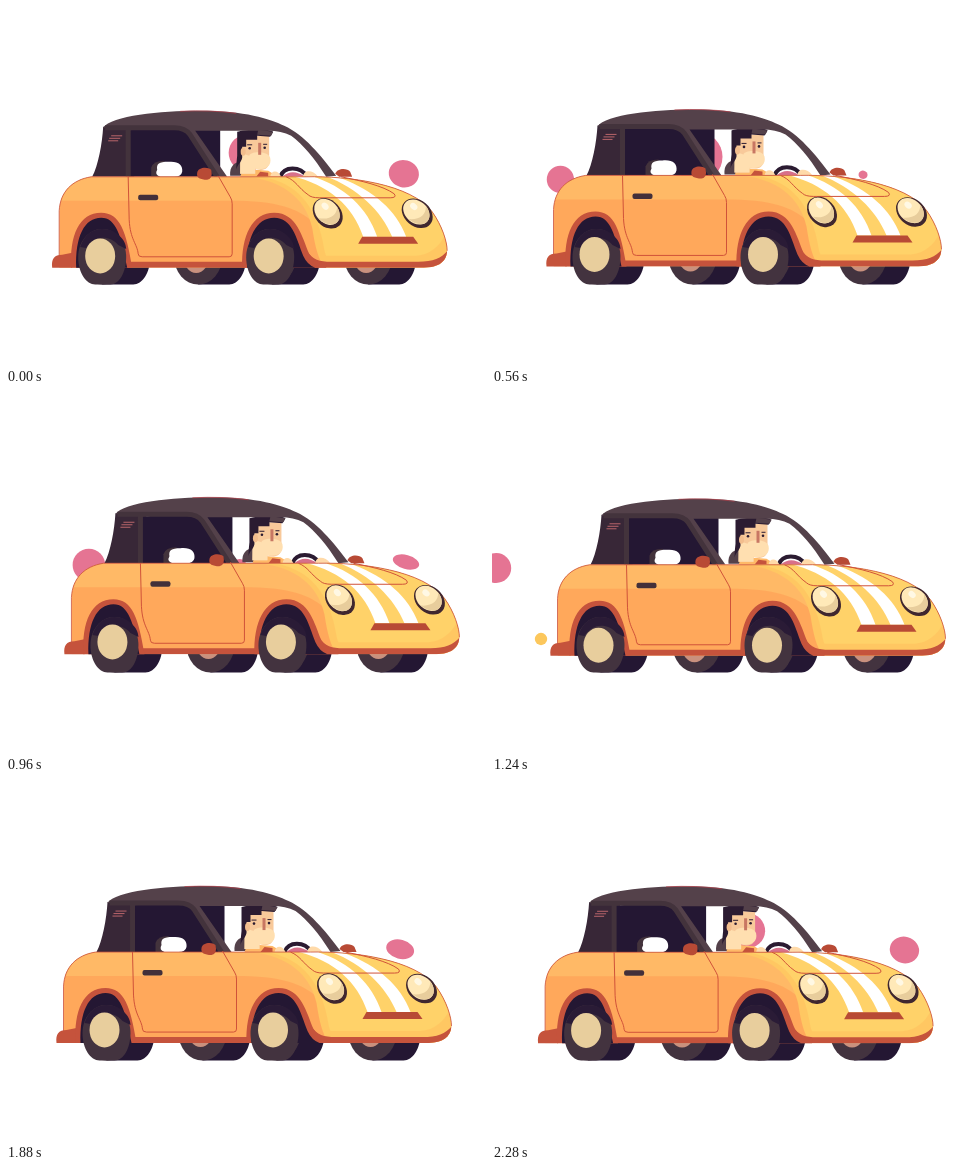
These frames come from a looping animation (480 by 360 pixels, 2.32 s). An HTML page:

```html
<!DOCTYPE html>
<html lang="en">
<head>
<meta charset="utf-8">
<title>Car ride</title>
<style>
html, body { margin: 0; width: 100%; height: 100%; overflow: hidden; background: #fff; }
svg { display: block; width: 100vw; height: 100vh; }
</style>
</head>
<body>
<svg viewBox="0 0 480 360">
  <defs>
    <g id="sideTread">
      <path fill="#241733" d="M96 223H119C134 223 144 236 144 251C144 267 136 278.500 127 278.500H96Z"/>
      <ellipse cx="96" cy="251" rx="24" ry="27.500" fill="#43333f"/>
    </g>
    <g id="face">
      <path fill="#43333f" d="M96 223C110 223 120 236 120 251C120 266 113 278.500 104 278.500H89C80 278.500 72 267 72 251C72 236 82 223 96 223Z"/>
      <path fill="#2a1b36" d="M96 223C110 223 120 234 120 243L112 239C103 229 88 229 80 242L74 241C78 229 86 223 96 223Z"/>
    </g>
    <clipPath id="shell">
      <path d="M85 171H300C342 170 405 178 426 206C436 220 441 236 441 245C440 258 430 262 415 262H53V205C54 186 66 174 85 171Z"/>
    </clipPath>
    <g id="lamp">
      <ellipse rx="13" ry="17" fill="#40272f"/>
      <ellipse cx=".5" cy="-1.5" rx="11" ry="14.500" fill="#ffe9b8"/>
      <path fill="#e8cd9c" d="M-10 -3C-4 6 5 8 11 2C10 8 6 13 .5 13C-5 13 -10 7 -10 -3Z"/>
      <ellipse cx="3" cy="-7" rx="3" ry="4" fill="#fff8e4"/>
    </g>
  </defs>

  <g id="puffs" fill="#e57493"></g>
  <circle id="spark" fill="#fcc75c"/>

  <g id="treads">
    <use href="#sideTread" x="96"/>
    <use href="#sideTread" x="266"/>
    <g class="rim" fill="#c9917e">
      <ellipse cx="190" cy="251" rx="13" ry="17"/>
      <ellipse cx="360" cy="251" rx="13" ry="17"/>
    </g>
    <use href="#sideTread"/>
    <use href="#sideTread" x="170"/>
  </g>

  <g id="body">
    <!-- driver -->
    <path fill="#54414a" d="M224 170C223 160 229 155 237 156V170Z"/>
    <path fill="#ffb867" d="M234 171L237 163L262 165L272 171Z"/>
    <path fill="#c5533c" d="M250 171L254 166L262 167V171Z"/>
    <path fill="#f8c99a" d="M235 130H263V156C263 163 257 166 249 163V168H234Z"/>
    <path fill="#ffdfb0" d="M234 147L243 150C244 145 262 145 264 152C266 161 258 165 249 163V168H234Z"/>
    <path fill="#2b1b31" d="M231 126C236 124 262 122 267 126L264 131L251 130V134H240V141H236V152C235 157 231 159 230 164Q230 158 231 150Z"/>
    <path fill="#54414a" d="M252 124L267 126L265 130L251 129Z"/>
    <path fill="#c87763" d="M252 137H255V149H252Z"/>
    <path stroke="#2b1b31" stroke-width="1" d="M241 139H246M257 138.500H261"/>
    <circle cx="243.500" cy="142.500" r="1.300" fill="#2b1b31"/>
    <circle cx="258.500" cy="142" r="1.300" fill="#2b1b31"/>
    <ellipse cx="237" cy="146" rx="2.500" ry="4" fill="#f2bd8d"/>
    <path fill="#d8708a" d="M276 171Q286 162 299 171Z"/>
    <path fill="none" stroke="#2b1b31" stroke-width="4" d="M274 171C278 160 294 160 301 171"/>
    <path fill="#ffdaa9" d="M297 171C297 164 306 163 312 171ZM264 171C265 164 272 164 275 171Z"/>

    <!-- cabin -->
    <path fill="#382737" d="M86 171C92 160 96 138 97 121L128 117V171Z"/>
    <path fill="#241733" d="M122 129Q122 124 128 124L178 121H214V168L208 171H122Z"/>
    <path fill="#43333c" d="M145 171V162Q147 155 158 155L162 171Z"/>
    <path fill="#fff" d="M154 171Q148 169 151 164C150 158 153 156 162 156C172 155 177 159 176 166Q175 171 168 171Z"/>
    <path fill="#54414a" d="M97 122C105 110 155 105 192 105C240 105 263 113 278 120C298 129 315 150 330 170L320 171C308 152 297 139 285 130Q275 125 262 125H189L221 171H211L184 131Q179 122 169 121H120Z"/>
    <path fill="none" stroke="#43333c" stroke-width="5" d="M99 122H168Q179 122 184 129L211 171M122 171V122"/>
    <path fill="none" stroke="#b6414b" stroke-width=".7" d="M174 105.500Q205 104 230 107.500"/>
    <path stroke="#b8646a" d="M105 130H116M103 132.500H114M102 135H112"/>

    <!-- shell -->
    <g clip-path="url(#shell)">
      <path fill="#ffa85b" d="M40 165H450V270H40Z"/>
      <path fill="#ffb966" d="M40 165H250C275 174 294 184 305 206L309 218C292 202 270 195 225 195H40Z"/>
      <path fill="#ffc762" d="M228 170C272 171 299 190 306 222C309 242 312 252 318 262H450V165H228Z"/>
      <path fill="#ffd269" d="M245 170C285 172 306 194 315 229C318 241 318 246 320 250H410C424 249 433 240 438 231L450 165H245Z"/>
      <path fill="#fff" d="M280 169C320 177 346 198 357 231H371C361 201 337 179 301 169ZM316 169C350 181 375 204 386 231H400C390 204 367 185 336 173Z"/>
      <path fill="#c5533c" d="M118 256H246V264H118ZM300 245C307 254 313 256 325 256H412C428 256 436 252 443 243V266H300Z"/>
    </g>
    <path fill="none" stroke="#c9513d" stroke-width=".8" d="M53 250V205C54 186 66 174 85 171H300C342 170 405 178 426 206C436 220 441 236 441 245"/>
    <path fill="none" stroke="#d05239" d="M280 171C290 175 292 182 302 189Q305 192 313 192H384Q391 192 388 188C377 180 355 175 335 171M122 171L123 214C124 234 131 238 132 248Q132 251 136 251H223Q226 251 226 248V198Q226 194 224 191L212 170"/>
    <path fill="#c5533c" d="M46 262C45 253 48 249 56 249L66 247V262Z"/>
    <path fill="#b84a35" d="M356 231H407L412 238H352Z"/>
    <path fill="#c5533c" d="M65 262C63 230 73 207 95 207C114 207 120 226 126 262ZM236 262C235 230 246 207 268 207C291 207 296 232 303 248Q308 257 320 257V262Z"/>
    <path fill="#241733" d="M70 262C69 231 78 212 95 212C110 212 115 230 121 262ZM241 262C240 232 250 212 268 212C286 212 290 232 297 250Q301 259 309 262Z"/>
    <rect x="132" y="189" width="20" height="5.500" rx="2" fill="#43303a"/>
    <path fill="#b84a35" d="M191 167C192 161 202 161 205 164Q207 173 201 174C194 174 190 172 191 167ZM329 168C331 162 341 162 344 166L346 171L333 171Z"/>
    <use href="#lamp" transform="translate(321.500 207.500) rotate(-43)"/>
    <use href="#lamp" transform="translate(411 207.500) rotate(-50)"/>
  </g>

  <g id="wheels">
    <use href="#face"/>
    <use href="#face" x="168"/>
    <g class="rim" fill="#e8ce9d">
      <ellipse cx="94" cy="251" rx="15" ry="17.500"/>
      <ellipse cx="262.500" cy="251" rx="15" ry="17.500"/>
    </g>
  </g>
</svg>
<script>
const LOOP = 2320, STEP = 40, TAU = Math.PI * 2;
const $ = id => document.getElementById(id);
const set = (el, attrs) => { for (const k in attrs) el.setAttribute(k, attrs[k]); };
const move = (el, x, y) => set(el, { transform: `translate(${x} ${y})` });
const clamp = v => Math.max(0, Math.min(1, v));
const lerp = (a, b, k) => a + (b - a) * k;
const rims = document.querySelectorAll('.rim');

// time at x = 400, radii at front, middle and back, front flatness, height midway
const puffs = [
  { at: -6, r: [15, 27, 15], flat: 0.9, mid: 146 },
  { at: 480, r: [4, 7, 16.5], flat: 0.9, mid: 172 },
  { at: 960, r: [13.5, 4, 4], flat: 0.52, mid: 180 },
  { at: 1864, r: [14, 19, 13.5], flat: 0.66, mid: 146 }
];
for (const p of puffs) {
  p.el = document.createElementNS('http://www.w3.org/2000/svg', 'ellipse');
  $('puffs').append(p.el);
}

function drawPuff(p, t) {
  const age = (t - p.at + 200 + LOOP) % LOOP - 200;
  const slow = Math.min(age, 1500);
  const x = 400 - 0.365 * slow + 0.000038 * slow * slow;
  const k = clamp((400 - x) / 165), b = clamp((235 - x) / 170);
  const grow = clamp((440 - x) / 28);
  const r = lerp(lerp(p.r[0], p.r[1], k), p.r[2], b) * grow;
  const y = lerp(lerp(168, p.mid, k), 174, b);
  set(p.el, {
    cx: x, cy: y, rx: r, ry: r * lerp(p.flat, 1, k),
    transform: `rotate(${15 * (1 - k)} ${x} ${y})`
  });
}

function draw(t) {
  const a = TAU * (t - 1110) / LOOP;
  const x = 7.2 + 6.3 * Math.cos(a) - 0.8 * Math.cos(2 * a);
  const beat = 6 * t / LOOP;
  const bob = Math.cos(TAU * (beat - 0.1)) - 1;
  const hop = 2.4 * Math.cos(TAU * (beat - 0.17)) - 2.2;
  move($('body'), x, bob);
  move($('treads'), x, 0);
  move($('wheels'), x, 0);
  rims.forEach(r => move(r, 0, hop));
  puffs.forEach(p => drawPuff(p, t));

  const s = clamp((t - 1160) / 200);
  set($('spark'), { cx: 67 - 45 * s, cy: 249 - 10 * s, r: 6.5 * Math.sin(Math.PI * s) });
}

const start = performance.now();
function tick() {
  const t = (performance.now() - start) % LOOP;
  draw(Math.floor(t / STEP) * STEP);
  requestAnimationFrame(tick);
}
tick();
</script>
</body>
</html>
```
